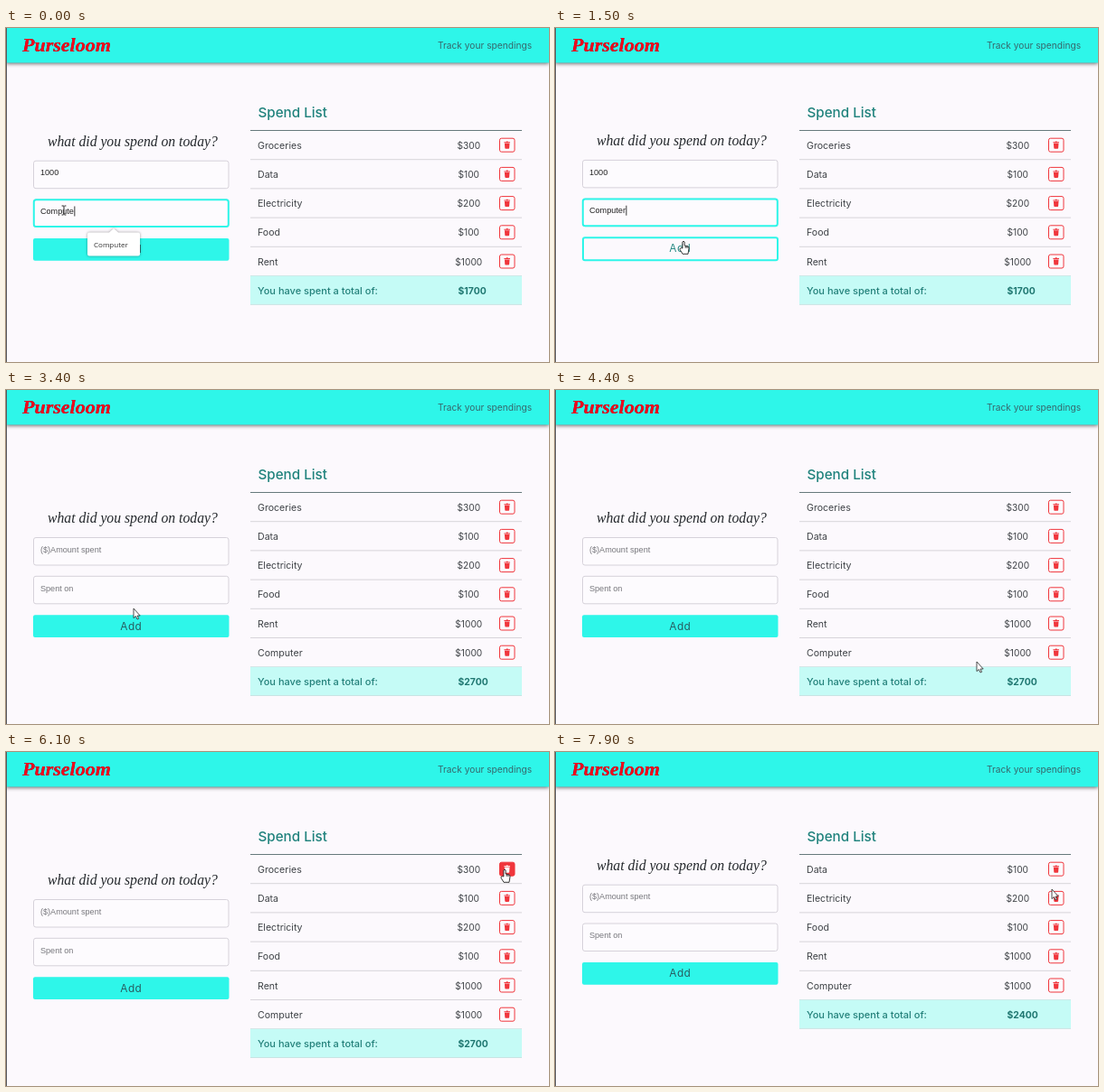
Animation of 600x370 px, one loop 8000 ms. Source, as an HTML page:

```html
<!DOCTYPE html>
<html lang="en">
<head>
<meta charset="utf-8">
<title>Spending tracker</title>
<style>
  html, body { margin: 0; width: 100%; height: 100%; overflow: hidden; background: #fcf9fd; }
  svg { display: block; width: 100%; height: 100%; }
  text { font: 10.6px Inter, "Open Sans", sans-serif; fill: #3f4347; white-space: pre; }
  .brand { font: italic bold 22px "Liberation Serif", serif; fill: #f2061c; filter: drop-shadow(.8px .8px .4px #5a1420); }
  .nav { font-size: 10.2px; fill: #37666b; }
  .question { font: italic 15.7px "Liberation Serif", serif; fill: #24282c; }
  .heading { font-size: 15.2px; font-weight: 500; fill: #1f827c; }
  .price { font-size: 10.2px; text-anchor: middle; }
  .total { font-size: 11px; font-weight: 500; fill: #23807a; }
  .sum { font-size: 10.4px; font-weight: 700; fill: #1f7771; }
  .value, .hint { font: 9.1px "Liberation Sans", sans-serif; fill: #222; }
  .hint { fill: #77777c; }
  .add { font-size: 11.8px; letter-spacing: .5px; text-anchor: middle; fill: #285d61; }
  .add.hover { fill: #288a84; }
  .option { font: 8px "Open Sans", sans-serif; fill: #333; }
  .status { font: 6.7px "Open Sans", sans-serif; fill: #fff; }
</style>
</head>
<body>
<svg id="stage" viewBox="0 0 600 370"></svg>
<script>
const LOOP = 8000, STEP = 100;
const CYAN = '#2ef6e9', RED = '#f0363c', PAPER = '#fcf9fd';
const ROW = 32.2, LIST_TOP = 113.5;
const SPENDINGS = [['Groceries', 300], ['Data', 100], ['Electricity', 200],
                   ['Food', 100], ['Rent', 1000], ['Computer', 1000]];

// Pointer path: time, x, y
const PATH = [
  [0, 64, 202], [1050, 64, 202], [1200, 104, 272], [1350, 140, 262], [1500, 142, 236],
  [1900, 141, 242], [3900, 141, 242], [4000, 190, 170], [4100, 330, 190], [4200, 446, 305],
  [4400, 466, 301], [4700, 500, 250], [5000, 560, 180], [5200, 556, 138], [5500, 551, 130],
  [7000, 551, 130], [7200, 544, 166], [7700, 543, 163], [7900, 549, 152], [8000, 549, 152]
];

const clamp = v => Math.max(0, Math.min(1, v));
const text = (cls, x, y, s) => `<text class="${cls}" x="${x}" y="${y}">${s}</text>`;
const rect = (x, y, w, h, attrs) => `<rect x="${x}" y="${y}" width="${w}" height="${h}" ${attrs}/>`;
const inside = (p, x, y, w, h) => p.x >= x && p.x <= x + w && p.y >= y && p.y <= y + h;

function pointerAt(t) {
  const i = PATH.findIndex(p => p[0] > t);
  const [t0, x0, y0] = PATH[i - 1], [t1, x1, y1] = PATH[i];
  const k = (t - t0) / (t1 - t0);
  return { x: x0 + (x1 - x0) * k, y: y0 + (y1 - y0) * k, kind: 'arrow' };
}

function drawPointer({ x, y, kind }) {
  const shapes = {
    arrow: '<path d="M0 0V10.6L2.4 8.5 4 12 5.6 11.3 4.1 8H7.2Z" fill="#fff" stroke="#222" stroke-width=".8"/>',
    hand: '<path d="M-1.1 8V1Q0-.7 1.1 1V5L5 6Q6 6.4 6 8L5 14.3H-1L-4 9.4Q-4 7.6-2.6 7.7ZM2.2 5.4v2.4M4 5.8v2.2" fill="#fff" stroke="#222" stroke-width=".9"/>',
    beam: '<path d="M-2.4-5H-.6L0-4.4.6-5H2.4M0-4.4V4.4M-2.4 5H-.6L0 4.4.6 5H2.4" fill="none" stroke="#222"/>'
  };
  return `<g transform="translate(${x} ${y})">${shapes[kind]}</g>`;
}

function drawNav() {
  return rect(0, 0, 600, 38.5, `fill="${CYAN}" style="filter:drop-shadow(0 1px 2px #0009)"`) +
    text('brand', 18, 26, 'Purseloom') + text('nav', 477, 22.7, 'Track your spendings');
}

function drawField(y, value, hint, focus) {
  const ring = focus ? rect(30.8, y + .3, 215, 29.8,
    `rx="2.5" fill="none" stroke="${CYAN}" stroke-width="2" opacity="${focus}"`) : '';
  return rect(30.5, y, 215.5, 30.5, 'rx="2.5" fill="#fdfbfe" stroke="#d6d2da"') + ring +
    text(value ? 'value' : 'hint', 38, y + 16.2, value || hint);
}

function drawForm(t, pointer) {
  const added = t >= 3400;
  const base = added && t < 7000 ? 16.3 : 0;
  const hover = inside(pointer, 30, 233 + base, 216, 25);
  const dy = base - (hover ? .8 : 0);
  const fields = [147.2 + dy, 190 + dy];
  if (hover) pointer.kind = 'hand';
  if (fields.some(y => inside(pointer, 30, y, 216, 31))) pointer.kind = 'beam';

  const word = t < 300 ? 'Compute' : 'Computer';
  const caretOn = t < 2300 && (t < 300 || Math.floor((t - 300) / 500) % 2 === 0);
  const caretX = t < 300 ? 75.4 : 78.4;
  const button = hover
    ? rect(31, 233 + dy, 215, 25, `rx="2" fill="${PAPER}" stroke="${CYAN}" stroke-width="2"`)
    : rect(30, 233 + dy, 216.5, 24.7, `rx="2" fill="${CYAN}"`);
  return text('question', 46, 131 + dy, 'what did you spend on today?') +
    drawField(fields[0], added ? '' : '1000', '($)Amount spent', 0) +
    drawField(fields[1], added ? '' : word, 'Spent on', clamp(1 - (t - 2200) / 300)) +
    (caretOn ? rect(caretX, 197.5 + dy, .9, 11, 'fill="#222"') : '') +
    button + text(hover ? 'add hover' : 'add', 138.3, 249.2 + dy, 'Add');
}

function drawSuggestion(t) {
  const opacity = clamp(1 - (t - 200) / 300);
  return opacity && `<g opacity="${opacity}">
    <path d="M92 226.5h22l5-4.500 5 4.500h22q2 0 2 2v22q0 2-2 2h-54q-2 0-2-2v-22q0-2 2-2z"
      fill="#fff" style="filter:drop-shadow(0 .5px 1.5px #0006)"/>
    ${text('option', 97, 242.7, 'Computer')}</g>`;
}

function drawTrash(y, hover) {
  return rect(545.5, y - 7.5, 16.5, 15, `rx="2" fill="${hover ? RED : PAPER}" stroke="${RED}"`) +
    `<path transform="translate(553.7 ${y})" fill="${hover ? '#fff' : RED}"
      d="M-3.3-3.500h2.100l.5-.8h1.400l.5.8h2.100v1h-6.600zM-2.800-2h5.600l-.4 5.200q0 .8-.8.8h-3.200q-.8 0-.8-.8z"/>`;
}

function drawList(t, pointer) {
  const items = SPENDINGS.slice(t < 7000 ? 0 : 1, t < 3400 ? 5 : 6);
  const sum = items.reduce((total, [, price]) => total + price, 0);
  const end = LIST_TOP + ROW * items.length;
  const rows = items.map(([name, price], i) => {
    const y = LIST_TOP + ROW * i, middle = y + 16.2;
    const hover = inside(pointer, 545, middle - 8, 17, 16);
    if (hover) pointer.kind = 'hand';
    return rect(270, y + ROW - .5, 300, 1, 'fill="#d8d5da"') +
      text('', 278, middle + 4, name) + text('price', 511.3, middle + 4, '$' + price) +
      drawTrash(middle, hover);
  });
  return text('heading', 278.5, 99, 'Spend List') + rows.join('') +
    rect(270, LIST_TOP - .5, 300, 1, 'fill="#66797c"') +
    rect(270, end, 300, ROW - .8, 'fill="#c5fbf6"') +
    rect(270, end + ROW - .8, 300, .8, 'fill="#bddfdd"') +
    text('total', 278, end + 20.3, 'You have spent a total of:') +
    text('sum', 499.5, end + 20.3, '$' + sum);
}

function drawStatus() {
  return rect(0, 361, 199, 12, 'rx="1.5" fill="#14386a"') +
    text('status', 4, 369.6, 'Waiting for track-your-spendings.herokuapp.com...');
}

function scene(t) {
  const pointer = pointerAt(t);
  const blank = t >= 7000 && t < 7600;
  const page = blank ? '' : drawNav() + drawForm(t, pointer) + drawList(t, pointer);
  return rect(0, 0, 600, 370, `fill="${PAPER}"`) + page +
    rect(0, 0, 1, 370, 'fill="#55565c"') +
    (t < 500 ? drawSuggestion(t) : '') +
    (t >= 6700 && t < 7900 ? drawStatus() : '') + drawPointer(pointer);
}

const stage = document.getElementById('stage');
let shown = -1;
function tick() {
  const t = Math.floor(performance.now() % LOOP / STEP) * STEP;
  if (t !== shown) stage.innerHTML = scene(shown = t);
  requestAnimationFrame(tick);
}
tick();
</script>
</body>
</html>
```
